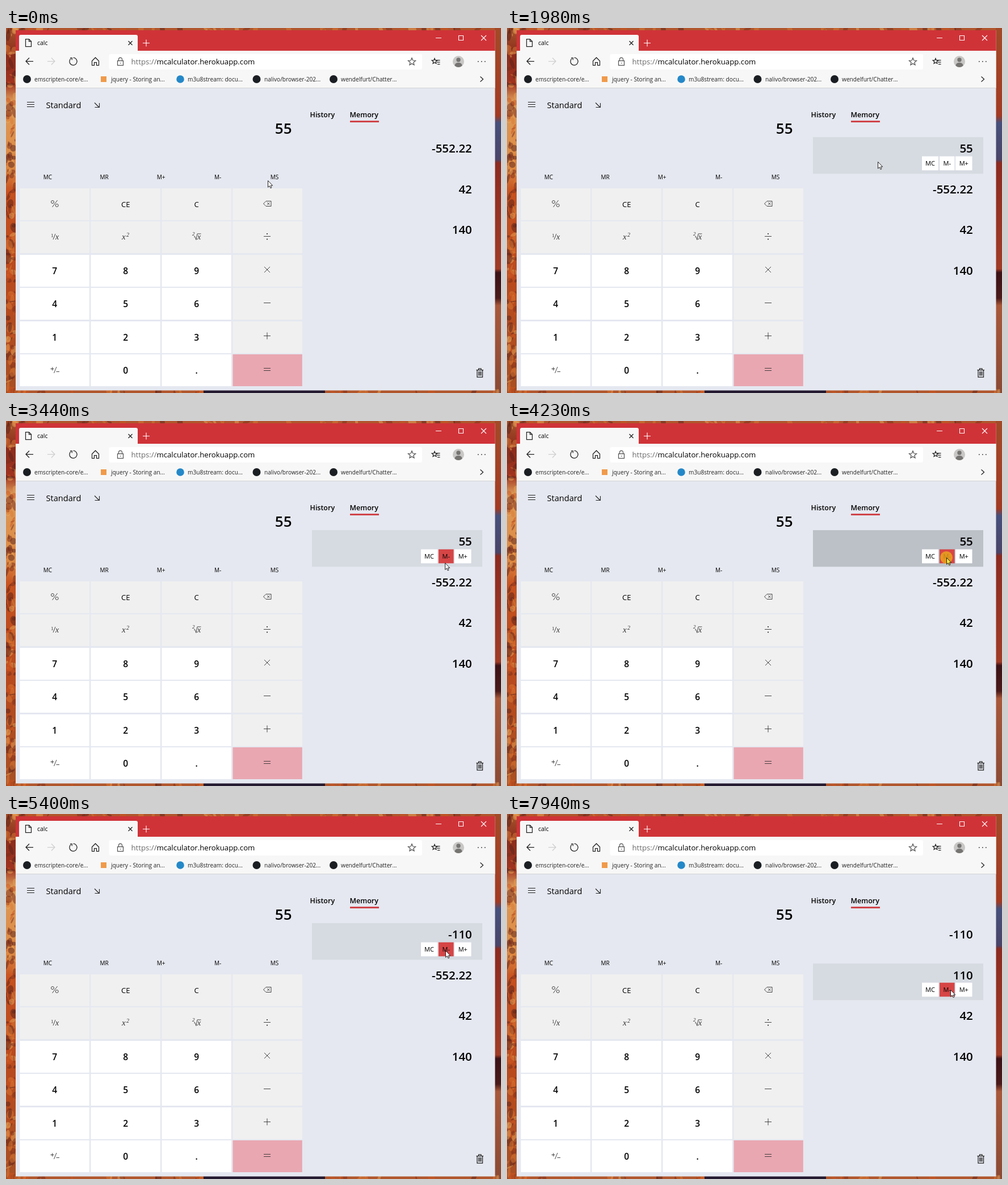
Write an HTML page that moves like this. It is 872 px wide and 642 px high and loops after 8 s.

```html
<!DOCTYPE html>
<html lang="en">
<head>
<meta charset="utf-8">
<title>calc</title>
<style>
  html, body { margin: 0; width: 100%; height: 100%; overflow: hidden; background: #b5562c; }
  svg { display: block; width: 872px; height: 642px; }
  text { font-family: "Open Sans", "Noto Sans", sans-serif; fill: #000; white-space: pre; }
  .bold { font-weight: 600; }
  .medium { font-weight: 500; }
  .mid { text-anchor: middle; }
  .end { text-anchor: end; }
  .math { font-family: "Liberation Serif", serif; font-style: italic; fill: #333; }
  .line { fill: none; stroke: #222; stroke-width: 1.1; }
  .thick { stroke-width: 1.25; }
  .thin { stroke: #333; stroke-width: .9; }
  .bookmark { font-size: 10.15px; fill: #222; }
  .value { font-size: 20.5px; font-weight: 600; text-anchor: end; }
</style>
</head>
<body>
<svg viewBox="0 0 872 642">
  <defs>
    <linearGradient id="left" x2="0" y2="1">
      <stop offset="0" stop-color="#a8552c"/><stop offset=".07" stop-color="#8a2c1c"/>
      <stop offset=".15" stop-color="#a03420"/><stop offset=".2" stop-color="#dc9a58"/>
      <stop offset=".38" stop-color="#dd8a44"/><stop offset=".45" stop-color="#c4501f"/>
      <stop offset=".7" stop-color="#b84a1e"/><stop offset="1" stop-color="#a85024"/>
    </linearGradient>
    <linearGradient id="right" x2="0" y2="1">
      <stop offset="0" stop-color="#a34a28"/><stop offset=".24" stop-color="#a23a22"/>
      <stop offset=".26" stop-color="#46507c"/><stop offset=".36" stop-color="#4a4468"/>
      <stop offset=".37" stop-color="#8c2a20"/><stop offset=".66" stop-color="#a03c26"/>
      <stop offset=".67" stop-color="#3c1216"/><stop offset=".74" stop-color="#4a1a1a"/>
      <stop offset=".76" stop-color="#a8583a"/><stop offset="1" stop-color="#8a4a34"/>
    </linearGradient>
  </defs>
  <rect width="872" height="642" fill="#b0562d"/>
  <rect width="18" height="642" fill="url(#left)"/>
  <rect x="861" width="11" height="642" fill="url(#right)"/>
  <g id="paint"></g>
  <rect x="348" y="637" width="214" height="5" fill="#241a30"/>

  <!-- window -->
  <rect x="17" y="4" width="844.5" height="633.5" fill="#e5e8f0"/>
  <rect x="17" y="4" width="844.5" height="36" fill="#cf3338"/>
  <rect x="17" y="40" width="844.5" height="65" fill="#f7f7f7"/>
  <path d="M17 105.5H861.5" stroke="#d3d4d8"/>
  <path d="M23 40V15q0-3 3-3H229q3 0 3 3V40z" fill="#f7f7f7"/>
  <path class="line thick" d="M34.5 19.5h6l4 4v9h-10zM40.5 19.5v4h4"/>
  <text x="55" y="29.7" font-size="10.5">calc</text>
  <path class="line thick" d="M215.5 23l7 7m0-7l-7 7"/>
  <path class="line" style="stroke:#fff" d="M241 26.5h12m-6-6v12M757 17.5h10M797.5 13.5h8v8h-8zM837 13l9 9m0-9l-9 9"/>

  <!-- toolbar -->
  <rect x="181.5" y="46" width="551.5" height="27" rx="3" fill="#fff"/>
  <g class="line thick">
    <path d="M48 58.5H35m6-6l-6 6l6 6"/>
    <path d="M73 58.5h13m-6-6l6 6l-6 6" style="stroke:#cfcfcf"/>
    <path d="M114 53.9a6.6 6.6 0 1 0 4.500-1.700M113 52.5h3.200v3.800"/>
    <path d="M151.5 58l6-6l6 6v7.500h-4v-5h-4v5h-4z"/>
    <path d="M196.5 57.5h10v8h-10zM198.5 57.5v-2.500a3 3 0 0 1 6 0v2.500M201.5 61v1.500" style="stroke:#555"/>
    <path id="star" style="stroke:#555"/>
    <path id="favorite"/>
    <path d="M757 56.5h7.500M759 60h5.500M760 63.5h4.500"/>
    <path d="M835.5 85.5l5 4.500l-5 4.500"/>
  </g>
  <text x="220.5" y="64" font-size="13.2"><tspan fill="#6b6b6b">https://</tspan>mcalculator.herokuapp.com</text>
  <circle cx="797" cy="59" r="10" fill="#c9c7c5"/>
  <circle cx="797" cy="56" r="3.7" fill="#767472"/>
  <path d="M790.5 66.5q0-5.500 6.500-5.500t6.500 5.500q-6.500 5-13 0z" fill="#767472"/>
  <path d="M831 59h1.600m4.400 0h1.600m4.400 0h1.600" stroke="#222" stroke-width="1.6"/>

  <!-- bookmarks -->
  <g fill="#1b1f23"><circle cx="37" cy="90" r="7"/><circle cx="441.5" cy="90" r="7"/><circle cx="577" cy="90" r="7"/></g>
  <rect x="167" y="85" width="10" height="10" fill="#f09a4a"/>
  <circle cx="307" cy="90" r="6.8" fill="#2488c8"/>
  <g>
    <text class="bookmark" x="50" y="93.700">emscripten-core/e...</text>
    <text class="bookmark" x="185" y="93.700">jquery - Storing an...</text>
    <text class="bookmark" x="320" y="93.700">m3u8stream: docu...</text>
    <text class="bookmark" x="455" y="93.700">nalivo/browser-202...</text>
    <text class="bookmark" x="590" y="93.700">wendelfurt/Chatter...</text>
  </g>

  <!-- calculator -->
  <path class="line" d="M37 130.5h13M37 134.5h13M37 138.5h13M156 131.5l8 8M164.5 132v7.500h-8"/>
  <text x="70.5" y="141" font-size="14.6">Standard</text>
  <text class="bold end" x="503.5" y="186" font-size="26">55</text>
  <text class="bold" x="535.5" y="157" font-size="12.5">History</text>
  <text class="bold" x="605.5" y="157" font-size="12.5">Memory</text>
  <rect x="606" y="163" width="51" height="3" fill="#d0444a"/>
  <rect id="store" x="423" y="242" width="100" height="39" fill="#bcc0c7"/>
  <g id="keys"></g>
  <g class="line thin">
    <path d="M90.5 303l-9 12"/><circle cx="82" cy="306" r="2.5"/><circle cx="89.7" cy="312" r="2.5"/>
    <path d="M453.5 309l4.500-4.500h9v9h-9zM460 306.7l4.600 4.600m0-4.600l-4.600 4.600"/>
    <path d="M87 362l-4 10M331 367.5l1.500-1l2.500 6l2-10.500h6.500"/>
    <path d="M454 366.5h12M455 420l10 10m0-10l-10 10M454 483.5h12M454 541.5h12m-6-6v12M454 598.5h12M454 602.5h12"/>
    <path d="M78.5 599.5h6m-3-3v6M89 596l-4.500 11M88.5 604.5h5.500"/>
  </g>
  <circle cx="460" cy="362" r=".9"/><circle cx="460" cy="371.5" r=".9"/>
  <text class="math" x="79" y="368" font-size="9" style="font-style:normal">1</text>
  <text class="math" x="87" y="372" font-size="14">x</text>
  <text class="math" x="204" y="372" font-size="15">x</text>
  <text class="math" x="212" y="367" font-size="10">2</text>
  <text class="math" x="328" y="365" font-size="9">2</text>
  <text class="math" x="337" y="372" font-size="14">x</text>
  <path class="line thick" d="M828.5 601.5h12.500M832.5 601.5v-2.500h4.500v2.500M830 601.5v12.500h9.500v-12.500M832.7 604v7.500M834.8 604v7.500M836.9 604v7.500"/>

  <g id="rows"></g>
  <circle id="press" r="10.8" fill="#eaa91a" opacity=".8"/>
  <path id="cursor" d="M.5.5V12.2L3.2 9.7L5 13.7L6.9 12.9L5.2 9.1H8.7z" stroke="#222" stroke-width="1"/>
</svg>
<script>
const LOOP = 8000;
const RED = '#d64546';
const $ = id => document.getElementById(id);

function add(parent, tag, attrs, text) {
  const el = document.createElementNS('http://www.w3.org/2000/svg', tag);
  for (const name in attrs) el.setAttribute(name, attrs[name]);
  if (text) el.textContent = text;
  return parent.appendChild(el);
}

function starPath(cx, cy, r) {
  const points = Array.from({ length: 10 }, (_, i) => {
    const a = i * Math.PI / 5 - Math.PI / 2, d = i % 2 ? r * 0.45 : r;
    return `${(cx + d * Math.cos(a)).toFixed(1)} ${(cy + d * Math.sin(a)).toFixed(1)}`;
  });
  return `M${points.join('L')}z`;
}
$('star').setAttribute('d', starPath(715, 59.5, 6.8));
$('favorite').setAttribute('d', starPath(755, 58.5, 5));

// Mottled wallpaper around the window
let seed = 7;
const random = () => (seed = seed * 16807 % 2147483647) / 2147483647;
const paints = ['#7a2c1a', '#e8a65a', '#cc5522', '#5a2219', '#da7a35'];
for (let i = 0; i < 240; i++) {
  const side = i % 5, along = random();
  const x = side < 3 ? random() * 17 : along * 872;
  const y = side < 3 ? along * 642 : side === 3 ? 2 : 640;
  add($('paint'), 'ellipse', {
    cx: x, cy: y, rx: 1 + random() * 6, ry: 1 + random() * 9,
    transform: `rotate(${random() * 60 - 30} ${x} ${y})`,
    fill: paints[Math.floor(random() * paints.length)], opacity: 0.5
  });
}

// Key pad
['MC', 'MR', 'M+', 'M-', 'MS'].forEach((label, i) =>
  add($('keys'), 'text', { class: 'medium mid', x: 73.3 + i * 99.9, y: 265.6, 'font-size': 10 }, label));
const pad = [' ', 'CE', 'C', ' ', ' ', ' ', ' ', ' ', '7', '8', '9', ' ',
  '4', '5', '6', ' ', '1', '2', '3', ' ', ' ', '0', '.', ' '];
pad.forEach((label, i) => {
  const col = i % 4, row = Math.floor(i / 4);
  const x = 24.5 + col * 125, y = Math.round(282 + row * 58.4);
  const fill = i === 23 ? '#e9a7b1' : col === 3 || row < 2 ? '#f0f0f0' : '#fff';
  add($('keys'), 'rect', { x, y, width: 122.3, height: 56, fill });
  add($('keys'), 'text', {
    class: row ? 'bold mid' : 'mid', x: x + 61.2, y: y + (row ? 34.2 : 33.4), 'font-size': row ? 15.5 : 13
  }, label);
});

// Memory list
const PITCH = 71.6;
const buttons = [['MC', 731, 29], ['M-', 762, 26.5], ['M+', 790, 29.5]];
const rows = [0, 1, 2, 3].map(i => {
  const top = Math.floor(192 + i * PITCH);
  const back = add($('rows'), 'rect', { x: 539, y: top, width: 300, height: 64.4 });
  const value = add($('rows'), 'text', { class: 'value', x: 820.8, y: 219.2 + i * PITCH });
  const tools = add($('rows'), 'g', {});
  const faces = buttons.map(([label, x, width]) => {
    const face = add(tools, 'rect', { x, y: top + 33.7, width, height: 24.6 });
    add(tools, 'text', { class: 'mid', x: x + width / 2, y: top + 50.4, 'font-size': 11 }, label);
    return face;
  });
  return { top, back, value, tools, faces };
});

// Cursor strokes: start, end, steps, control point, end point
const START = [461, 268];
const moves = [
  [1560, 2290, 10, [655.5, 186.5], [735, 285]],
  [2370, 2830, 7, [783, 283.6], [770, 268]],
  [2980, 3610, 9, [773, 254], [774, 240]],
  [5860, 6620, 11, [776, 272], [790, 303]],
  [6700, 6850, 3, [794, 304], [797, 305]],
  [7940, 7940, 1, [781, 309], [781, 309]]
];
const presses = [[150, 380], [4230, 4460], [4610, 4860], [5170, 5400], [7020, 7250]];
const firstValue = [[380, '55'], [4460, '0'], [4860, '-55'], [5400, '-110']];

function cursorAt(t) {
  let from = START;
  for (const [start, end, steps, control, to] of moves) {
    if (t < start) break;
    const step = steps > 1 ? Math.floor((t - start + 8) / (end - start) * (steps - 1)) : 0;
    const u = Math.min(1, (step + 1) / steps), v = 1 - u;
    const origin = from;
    from = to.map((p, i) => v * v * origin[i] + 2 * u * v * control[i] + u * u * p);
  }
  return from;
}

function rowAt(t) {
  const [x, y] = cursorAt(t);
  return x < 539 || x > 839 ? -1 : rows.findIndex(r => y >= r.top && y <= r.top + 64.4);
}

function valuesAt(t) {
  const second = t < 7250 ? '-552.22' : '110';
  const rest = [second, '42', '140'];
  const latest = firstValue.filter(([at]) => t >= at).pop();
  return latest ? [latest[1], ...rest] : [...rest, ''];
}

function draw(t) {
  const [x, y] = cursorAt(t);
  const pressed = presses.some(([down, up]) => t >= down && t < up);
  const hovered = rowAt(t);
  const recent = [0, 30, 60, 90, 120].map(lag => rowAt(t - lag));
  const values = valuesAt(t);

  rows.forEach((row, i) => {
    const active = i === hovered;
    row.value.textContent = values[i];
    row.back.setAttribute('fill', active && pressed ? '#bcc0c7' : '#d6dae1');
    row.back.setAttribute('opacity', recent.filter(r => r === i).length / recent.length);
    row.tools.style.display = active ? '' : 'none';
    row.faces.forEach((face, b) => {
      const [, left, width] = buttons[b];
      const over = x >= left && x <= left + width && y >= row.top + 33.7 && y <= row.top + 58.3;
      face.setAttribute('fill', over ? RED : '#fff');
    });
  });

  $('store').style.display = pressed && t < 380 ? '' : 'none';
  $('press').style.display = pressed ? '' : 'none';
  $('press').setAttribute('transform', `translate(${x} ${y})`);
  $('cursor').setAttribute('transform', `translate(${x} ${y})`);
  $('cursor').setAttribute('fill', pressed ? '#ffe838' : '#fff');
}

const begin = performance.now();
function tick() {
  draw((performance.now() - begin) % LOOP);
  requestAnimationFrame(tick);
}
tick();
</script>
</body>
</html>
```
